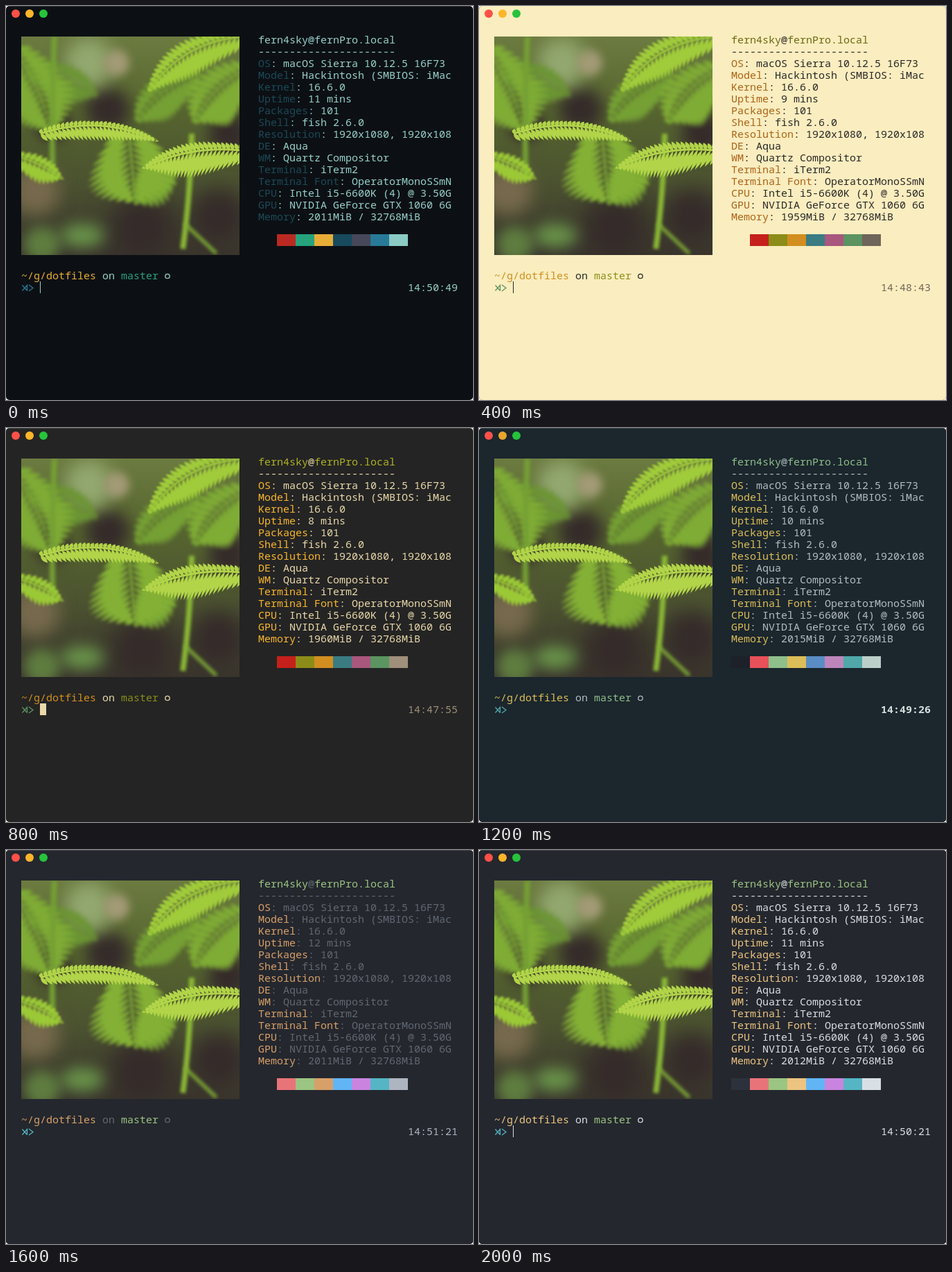
An HTML page with a canvas for the animation above (2400 ms loop, 674 by 568 pixels).

```html
<!DOCTYPE html>
<html lang="en">
<head>
<meta charset="utf-8">
<title>Terminal themes</title>
<style>
  html, body { margin: 0; width: 100%; height: 100%; overflow: hidden; background: #fff; }
  #window { position: relative; width: 674px; height: 568px; overflow: hidden; border-radius: 5px; }
  #photo { position: absolute; left: 22px; top: 44px; }
  .screen { position: absolute; inset: 0; background: var(--bg); color: var(--fg);
    font: 500 15px/17px "Noto Sans Mono", "DejaVu Sans Mono", monospace;
    font-variant-ligatures: none; box-shadow: inset 0 1px rgba(255, 255, 255, .14); }
  .screen > * { position: absolute; white-space: pre; }
  .light { width: 12px; height: 12px; top: 5px; border-radius: 50%; }
  .label { color: var(--label); }
  .title { color: var(--title); }
  .path { color: var(--path); }
  .branch { color: var(--branch); }
  .clock { color: var(--clock); }
  .swatch { width: 27px; height: 17px; top: 329px; }
  .cursor { left: 49px; top: 397px; height: 17px; background: var(--fg); }
  svg { left: 0; top: 0; fill: none; stroke-width: 1.3; }
</style>
</head>
<body>
<div id="window"><canvas id="photo" width="315" height="315"></canvas></div>
<script>
const LOOP = 2400;
const CELL = 9, ROW = 17, LEFT = 22, TOP = 40;

const gruvbox = '#c5201b #8c8d18 #d28f1f #3a7c82 #a9577d #5b9361';
const oneDark = '#61b5f5 #c984e0 #55b5c4';

// The palette runs black, red, green, yellow, blue, magenta, cyan, white.
const themes = [
  { bg: '#0c1014', fg: '#96d0ca', label: '#1d4958', title: '#96d0ca', clock: '#96d0ca',
    palette: '#0c1014 #ba2a22 #26a27c #e8ad37 #174a5d #47475a #287a98 #8bcbc3',
    caret: 1, up: 11, mem: 2011, time: '14:50:49' },
  { bg: '#faedbf', fg: '#2b2828', label: '#ab6318', title: '#6c6910',
    palette: `#faedbf ${gruvbox} #70655a`,
    caret: 1, up: 9, mem: 1959, time: '14:48:43' },
  { bg: '#242424', fg: '#e9d8aa', label: '#f8b62d', title: '#aeb224',
    palette: `#242424 ${gruvbox} #9f8f7b`,
    caret: CELL, up: 8, mem: 1960, time: '14:47:55' },
  { bg: '#1b262d', fg: '#b4bbc2', amber: '#e9a62d', clockWeight: 700,
    palette: '#1c212a #e85159 #8fbf8a #dcbe58 #5a8dc4 #bd86bb #50a8a8 #bcd0c9',
    caret: 0, up: 10, mem: 2015, time: '14:49:26', clock: '#d5dedc' },
  { bg: '#24272e', fg: '#616772',
    palette: `#24272e #e8747a #9bc582 #d7a069 ${oneDark} #adb5c0`,
    caret: 0, up: 12, mem: 2011, time: '14:51:21' },
  { bg: '#24272e', fg: '#dadee3',
    palette: `#2c323b #e8747a #9bc582 #ecc480 ${oneDark} #d9e0e5`,
    caret: 1, up: 11, mem: 2012, time: '14:50:21' }
];

const span = (name, text) => `<span class="${name}">${text}</span>`;
const line = (col, row, html, style = '') =>
  `<div style="left:${LEFT + col * CELL}px;top:${TOP + row * ROW}px;${style}">${html}</div>`;
const dots = (name, colors, left, step) => colors.map((color, i) =>
  `<i class="${name}" style="left:${left + i * step}px;background:${color}"></i>`).join('');

function info({ up, mem }) {
  const facts = {
    OS: 'macOS Sierra 10.12.5 16F73', Model: 'Hackintosh (SMBIOS: iMac', Kernel: '16.6.0',
    Uptime: `${up} mins`, Packages: '101', Shell: 'fish 2.6.0',
    Resolution: '1920x1080, 1920x108', DE: 'Aqua', WM: 'Quartz Compositor',
    Terminal: 'iTerm2', 'Terminal Font': 'OperatorMonoSSmN',
    CPU: 'Intel i5-6600K (4) @ 3.50G', GPU: 'NVIDIA GeForce GTX 1060 6G',
    Memory: `${mem}MiB / 32768MiB`
  };
  return [
    `${span('title', 'fern4sky')}@${span('title', 'fernPro.local')}`,
    '-'.repeat(22),
    ...Object.entries(facts).map(([key, value]) => `${span('label', key)}: ${value}`)
  ].map((html, row) => line(38, row, html)).join('');
}

function screen(theme) {
  const palette = theme.palette.split(' ');
  const [, , green, yellow, , , cyan, white] = palette;
  const colors = { label: yellow, title: green, path: yellow, branch: green, clock: white, ...theme };
  const el = document.createElement('div');
  el.className = 'screen';
  for (const key of ['bg', 'fg', 'label', 'title', 'path', 'branch', 'clock'])
    el.style.setProperty('--' + key, colors[key]);
  el.innerHTML =
    dots('light', ['#fd5048', theme.amber || '#fdb52a', '#27c33b'], 8, 20) +
    info(theme) +
    dots('swatch', palette, 364, 27) +
    line(0, 20, `${span('path', '~/g/dotfiles')} on ${span('branch', 'master')}`) +
    line(62, 21, span('clock', theme.time), `font-weight:${theme.clockWeight || 500}`) +
    `<svg width="674" height="568"><circle cx="233" cy="389.5" r="3.2" stroke="${theme.fg}"/>
     <path d="M23.5 402.5l7 8M23.5 410.5l7-8v8M33 402l6 4.5l-6 4.5" stroke="${cyan}"/></svg>` +
    `<i class="cursor" style="width:${theme.caret}px"></i>`;
  return el;
}

// Fern scene: depth runs from 0 (sharp, bright) to 1 (soft, dark).
const photo = document.getElementById('photo');
const ctx = photo.getContext('2d');
const mix = (a, b, t) => a + (b - a) * t;
const leafColor = depth => `hsl(${75 + 15 * depth} ${62 - 18 * depth}% ${56 - 24 * depth}%)`;
const focus = depth => { ctx.filter = `blur(${.5 + 4 * depth}px)`; };

function patch(x, y, r, color, squash = 1) {
  ctx.filter = `blur(${r * .35}px)`;
  ctx.fillStyle = color;
  ctx.beginPath();
  ctx.ellipse(x, y, r, r * squash, 0, 0, Math.PI * 2);
  ctx.fill();
}

function curve([x0, y0], [x1, y1], bend) {
  const cx = (x0 + x1) / 2 + (y1 - y0) * bend;
  const cy = (y0 + y1) / 2 - (x1 - x0) * bend;
  return t => [mix(mix(x0, cx, t), mix(cx, x1, t), t), mix(mix(y0, cy, t), mix(cy, y1, t), t)];
}

function stem(from, to, bend, width, depth) {
  const at = curve(from, to, bend);
  focus(depth);
  ctx.strokeStyle = leafColor(depth);
  ctx.lineWidth = width;
  ctx.beginPath();
  for (let t = 0; t <= 1; t += .05) ctx.lineTo(...at(t));
  ctx.stroke();
}

// Leaflets lean towards the tip; on a level frond the upper row is foreshortened.
function frond(from, to, bend, leaf, depth) {
  const at = curve(from, to, bend);
  const gap = 6 + 6 * depth;
  const count = Math.hypot(to[0] - from[0], to[1] - from[1]) / gap;
  focus(depth);
  ctx.fillStyle = leafColor(depth);
  ctx.beginPath();
  for (let i = 0; i < count; i++) {
    const t = i / count;
    const [x, y] = at(t), [nx, ny] = at(t + .01);
    const heading = Math.atan2(ny - y, nx - x);
    for (const side of [-1, 1]) {
      const angle = heading + side * 1.1;
      const upper = Math.sin(angle) < 0;
      const length = leaf * Math.sin(Math.PI * (.2 + .8 * t)) *
        (upper ? .3 + .6 * Math.abs(Math.sin(heading)) : 1);
      const dx = Math.cos(angle), dy = Math.sin(angle);
      const mx = x + dx * length * .4, my = y + dy * length * .4;
      ctx.moveTo(x, y);
      ctx.quadraticCurveTo(mx - dy * gap, my + dx * gap, x + dx * length, y + dy * length);
      ctx.quadraticCurveTo(mx + dy * gap, my - dx * gap, x, y);
    }
  }
  ctx.fill();
  stem(from, to, bend, 3, depth);
}

function paintPhoto() {
  const base = ctx.createLinearGradient(0, 0, 0, 315);
  ['#6c7b40', '#56652f', '#4b5230', '#3a352d'].forEach((color, i) => base.addColorStop(i / 3, color));
  ctx.fillStyle = base;
  ctx.fillRect(0, 0, 315, 315);

  for (const [x, y, r] of [[125, 105, 32], [45, 125, 26], [300, 140, 30], [175, 275, 48], [285, 260, 40]])
    patch(x, y, r, '#352b2a');
  patch(98, 38, 36, '#93a870');
  patch(138, 38, 18, '#a39a76');
  patch(20, 222, 35, '#77694d');
  patch(30, 300, 26, '#5f7d40');
  patch(88, 287, 32, '#6b984b', .5);

  frond([10, 45], [110, 85], .15, 45, .7);
  frond([-10, 20], [45, 140], .1, 60, .5);
  frond([255, 55], [165, 125], -.2, 45, .6);
  frond([330, 45], [250, 125], -.2, 60, .5);
  frond([215, 180], [165, 240], 0, 40, .55);
  frond([155, 135], [165, 240], 0, 75, .45);
  stem([48, 0], [46, 220], -.02, 8, .6);
  stem([246, 140], [232, 315], .03, 8, .4);
  stem([236, 270], [284, 315], 0, 5, .5);
  frond([-10, 172], [60, 205], .1, 30, .25);

  frond([325, 0], [181, 82], -.25, 40, .2);
  frond([28, 140], [200, 152], .2, 25, 0);
  frond([325, 165], [174, 190], -.15, 42, 0);
}

paintPhoto();

// Each later screen covers the earlier ones from its own step until the loop ends.
themes.forEach((theme, i) => {
  const el = screen(theme);
  photo.before(el);
  if (i) el.animate([
    { opacity: 0, offset: 0, easing: 'step-end' },
    { opacity: 1, offset: i / themes.length },
    { opacity: 1, offset: 1 }
  ], { duration: LOOP, iterations: Infinity });
});
</script>
</body>
</html>
```
